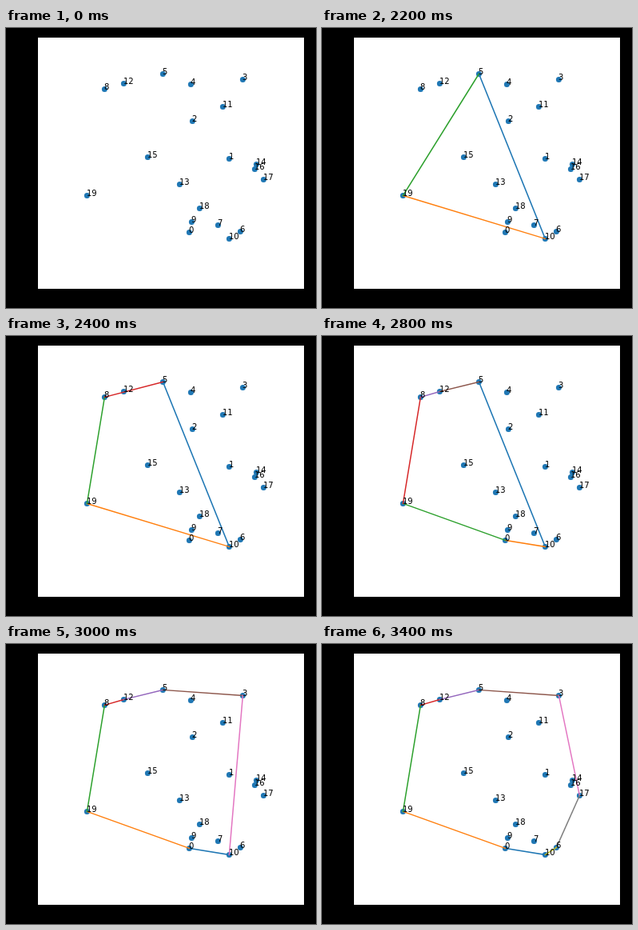
Animation of 388 by 350 pixels, one loop 4600 ms. Source, as an HTML page with a canvas:

```html
<!DOCTYPE html>
<html lang="en">
<head>
<meta charset="utf-8">
<title>Quickhull</title>
<style>
  html, body { margin: 0; width: 100%; height: 100%; overflow: hidden; background: #000; }
  canvas { display: block; }
</style>
</head>
<body>
<canvas id="stage" width="388" height="350"></canvas>
<script>
const ctx = document.getElementById('stage').getContext('2d');
const LOOP = 4600;
const COLORS = ['#1f77b4', '#ff7f0e', '#2ca02c', '#d62728', '#9467bd',
                '#8c564b', '#e377c2', '#7f7f7f', '#bcbd22'];

// Point centres, listed by label number.
const POINTS = [
  [229, 255], [279, 163], [233, 116], [296, 64], [231, 70],
  [196, 57], [293, 254], [265, 246], [123, 76], [232, 242],
  [279, 263], [271, 98], [147, 69], [217, 195], [313, 170],
  [177, 161], [311, 176], [322, 189], [242, 225], [101, 209]
];

// Each step: start time in ms, hull vertices in drawing order.
const STEPS = [
  [0, []],
  [1000, [5, 10]],
  [2200, [5, 10, 19]],
  [2400, [5, 10, 19, 8]],
  [2600, [5, 10, 19, 8, 12]],
  [2800, [5, 10, 0, 19, 8, 12]],
  [3000, [10, 0, 19, 8, 12, 5, 3]],
  [3200, [10, 0, 19, 8, 12, 5, 3, 17]],
  [3400, [10, 0, 19, 8, 12, 5, 3, 17, 6]]
];

const center = i => POINTS[i].map(v => v + 0.4);

// "i" for points left of the dividing line a-b, "d" for points right of it.
function side(i, a, b) {
  if (i === a || i === b) return '';
  const [x, y] = POINTS[i], [ax, ay] = POINTS[a], [bx, by] = POINTS[b];
  return (bx - ax) * (y - ay) - (by - ay) * (x - ax) > 0 ? 'i' : 'd';
}

function drawMarker(i) {
  ctx.beginPath();
  ctx.arc(...center(i), 3.5, 0, 2 * Math.PI);
  ctx.fill();
}

function drawEdge(a, b, color) {
  ctx.strokeStyle = color;
  ctx.beginPath();
  ctx.moveTo(...center(a));
  ctx.lineTo(...center(b));
  ctx.stroke();
}

function draw(hull) {
  const splitting = hull.length === 2;
  ctx.fillStyle = '#000';
  ctx.fillRect(0, 0, 388, 350);
  ctx.fillStyle = '#fff';
  ctx.fillRect(40, 12, 333, 314);

  ctx.fillStyle = COLORS[0];
  POINTS.forEach((_, i) => drawMarker(i));

  ctx.lineWidth = 1.5;
  ctx.lineCap = 'square';
  const edges = splitting ? 1 : hull.length;
  for (let k = 0; k < edges; k++) {
    drawEdge(hull[k], hull[(k + 1) % hull.length], COLORS[k]);
  }

  ctx.fillStyle = '#000';
  ctx.font = '10px "DejaVu Sans", sans-serif';
  POINTS.forEach(([x, y], i) => {
    ctx.fillText(i + (splitting ? side(i, ...hull) : ''), x, y + 1);
  });
}

let shown = null;
function tick() {
  const t = performance.now() % LOOP;
  const step = STEPS.findLast(([start]) => start <= t);
  if (step !== shown) draw((shown = step)[1]);
  requestAnimationFrame(tick);
}
tick();
</script>
</body>
</html>
```
